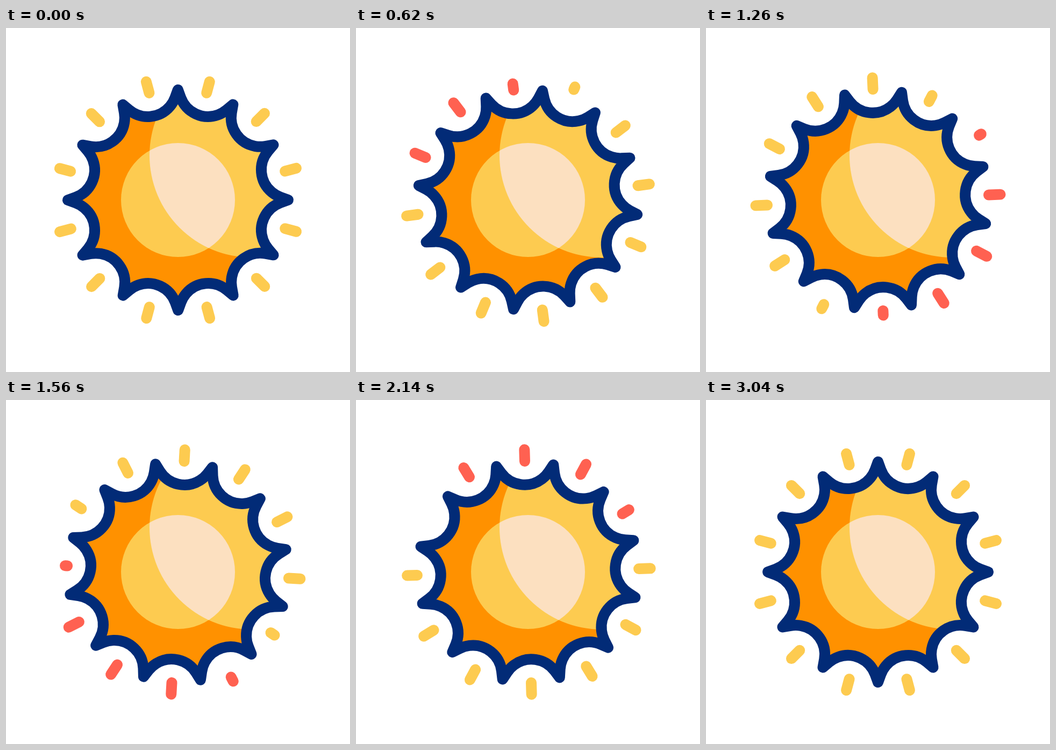
Write an HTML page with a canvas that moves like this. It is 640 px wide and 640 px high and loops after 3600 ms.

```html
<!DOCTYPE html>
<html lang="en">
<head>
<meta charset="utf-8">
<title>Turning sun</title>
<style>
html, body { margin: 0; width: 100%; height: 100%; overflow: hidden; background: #fff; }
canvas { display: block; width: 640px; height: 640px; }
</style>
</head>
<body>
<canvas width="640" height="640"></canvas>
<script>
const ctx = document.querySelector('canvas').getContext('2d');
const NAVY = '#022b77', ORANGE = '#ff9100', YELLOW = '#fdcb50', PEACH = '#fce0c0', RED = '#ff6151';
const LOOP = 3600, TURN = 3040, RAYS = 12, STEP = 500 / 3, SWEEP = 500 / 3;
const RAY_IN = 206.2, RAY_OUT = 227.8;
const rad = deg => deg * Math.PI / 180;
const clamp = v => Math.min(1, Math.max(0, v));
const polar = (r, a) => [r * Math.cos(a), r * Math.sin(a)];

const bezier = (u, a, b) => 3 * u * (1 - u) ** 2 * a + 3 * u * u * (1 - u) * b + u ** 3;

// Pulls back a little, turns, overshoots and settles.
function ease(p) {
  let lo = 0, hi = 1;
  for (let i = 0; i < 40; i++) {
    const mid = (lo + hi) / 2;
    if (bezier(mid, 0.326, 0.56) < p) lo = mid; else hi = mid;
  }
  return bezier(lo, -0.27, 1.24);
}

function disc(x, y, r) {
  const path = new Path2D();
  path.arc(x, y, r, 0, 2 * Math.PI);
  return path;
}
const core = disc(0, 0, 106);
const light = disc(137, -83, 190);

function sunPath(turn) {
  const path = new Path2D();
  for (let i = 0; i < RAYS; i++) {
    const a = turn + rad(30 * i - 75), inward = a + Math.PI;
    path.lineTo(...polar(205, a - rad(15)));
    path.arc(...polar(216.4, a), 54, inward + rad(55), inward - rad(55), true);
  }
  path.closePath();
  return path;
}

function fill(path, color) {
  ctx.fillStyle = color;
  ctx.fill(path);
}

function lit(path, base, bright) {
  fill(path, base);
  ctx.save();
  ctx.clip(path);
  fill(light, bright);
  ctx.restore();
}

// from and to run from 0 (inner end) to 1 (outer end)
function dash(angle, from, to, color) {
  if (to - from < 0.005) return;
  const radius = f => RAY_IN + (RAY_OUT - RAY_IN) * f;
  ctx.strokeStyle = color;
  ctx.beginPath();
  ctx.moveTo(...polar(radius(from), angle));
  ctx.lineTo(...polar(radius(to), angle));
  ctx.stroke();
}

function ray(angle, time) {
  const sweep = start => clamp((time - start) / SWEEP);
  dash(angle, sweep(0), 1, YELLOW);
  dash(angle, sweep(800), sweep(200), RED);
  dash(angle, 0, sweep(1000), YELLOW);
}

function draw(t) {
  const turn = t < TURN ? Math.PI * ease(t / TURN) : Math.PI;
  const sun = sunPath(turn);
  ctx.setTransform(1, 0, 0, 1, 320, 320);
  ctx.fillStyle = '#fff';
  ctx.fillRect(-320, -320, 640, 640);
  ctx.lineWidth = 20;
  ctx.lineCap = ctx.lineJoin = 'round';

  lit(sun, ORANGE, YELLOW);
  lit(core, YELLOW, PEACH);
  ctx.strokeStyle = NAVY;
  ctx.stroke(sun);
  for (let i = 0; i < RAYS; i++) ray(turn + rad(30 * i - 165), t + 4 - i * STEP);
}

const began = performance.now();
function tick() {
  const t = (performance.now() - began) % LOOP;
  draw(t);
  requestAnimationFrame(tick);
}
tick();
</script>
</body>
</html>
```
